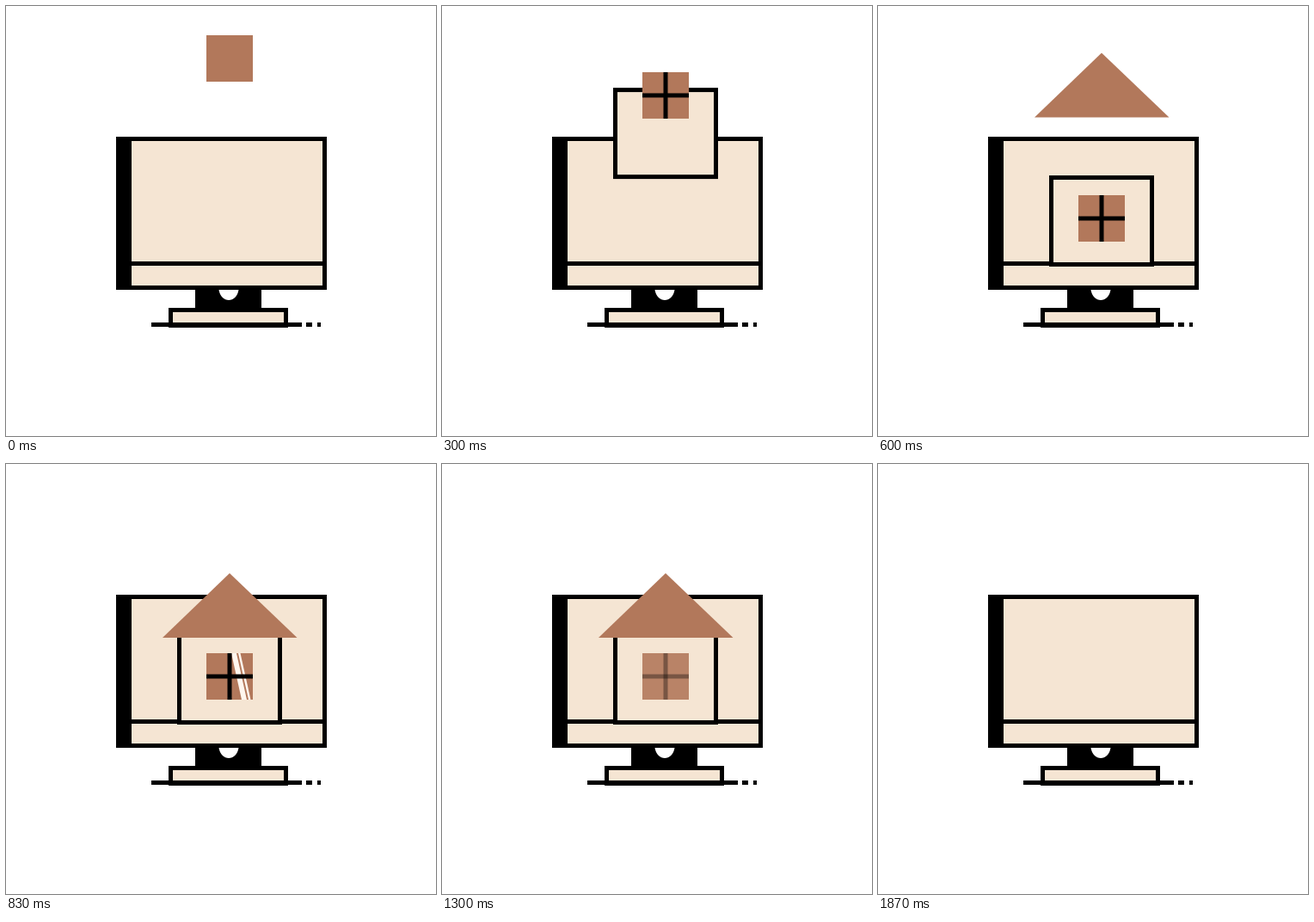
Animation of 500x500 px, one loop 2000 ms. Source, as an HTML page with a canvas:

```html
<!DOCTYPE html>
<html lang="en">
<head>
<meta charset="utf-8">
<title>House on a screen</title>
<style>
  html, body { margin: 0; width: 100%; height: 100%; overflow: hidden; background: #fff; }
  canvas { display: block; }
</style>
</head>
<body>
<canvas id="stage" width="500" height="500"></canvas>
<script>
const ctx = document.getElementById('stage').getContext('2d');
const BLACK = '#000', CREAM = '#f5e5d3', BROWN = '#b2785b', WHITE = '#fff';
const LOOP = 2000;

const ease = (f, from, to) => {
  const p = Math.min(1, Math.max(0, (f - from) / (to - from)));
  return p * p * (3 - 2 * p);
};

function rect(color, x, y, w, h) {
  ctx.fillStyle = color;
  ctx.fillRect(x, y, w, h);
}

function framed(x, y, w, h) {
  rect(BLACK, x, y, w, h);
  rect(CREAM, x + 5, y + 5, w - 10, h - 10);
}

function polygon(color, ...points) {
  ctx.fillStyle = color;
  ctx.beginPath();
  for (const [x, y] of points) ctx.lineTo(x, y);
  ctx.fill();
}

// Draws a part in its own layer state, shifted and faded.
function layer(alpha, dy, draw) {
  if (alpha <= 0) return;
  ctx.save();
  ctx.globalAlpha = alpha;
  ctx.translate(0, dy);
  draw();
  ctx.restore();
}

function monitor() {
  framed(128, 152, 245, 178);
  rect(BLACK, 128, 152, 18, 178);
  rect(BLACK, 146, 297, 225, 5);
  rect(BLACK, 220, 329, 77, 23);
  ctx.fillStyle = WHITE;
  ctx.beginPath();
  ctx.moveTo(247.5, 330);
  ctx.bezierCurveTo(250, 346, 268, 346, 270.5, 330);
  ctx.fill();
  framed(189, 351, 139, 23);
  rect(BLACK, 169, 368, 175, 5);
  rect(BLACK, 349, 368, 7, 5);
  rect(BLACK, 362, 368, 4, 5);
}

function wall() {
  const [x, y, w, h] = [199, 197, 122, 106];
  rect(CREAM, x + 5, y + 5, w - 10, h - 10);
  ctx.lineWidth = 5;
  ctx.strokeStyle = BLACK;
  ctx.strokeRect(x + 2.5, y + 2.5, w - 5, h - 5);
}

function shine(x) {
  ctx.beginPath();
  ctx.rect(233, 220, 54, 54);
  ctx.clip();
  const stripe = (left, width) => polygon('#fff6ee',
    [x + left, 220], [x + left + width, 220],
    [x + left + width + 12, 274], [x + left + 12, 274]);
  stripe(-10, 6);
  stripe(-2, 2.5);
}

function cross(f) {
  rect(BLACK, 257.5, 220, 5, 54 * ease(f, 0, 4));
  rect(BLACK, 233, 244.5, 54 * ease(f, 2, 6), 5);
}

const roof = () => polygon(BROWN, [260, 127], [338.5, 202], [182, 202]);

function draw(f) {
  rect(WHITE, 0, 0, 500, 500);
  monitor();

  const houseAlpha = 1 - ease(f, 51, 56);
  if (f >= 4) layer(houseAlpha, -187 * (1 - ease(f, 4.3, 14.3)), wall);

  const drop = -186 * (1 - ease(f, 5.83, 16));
  layer(1 - ease(f, 38, 43), drop, () => rect(BROWN, 233, 220, 54, 54));
  if (f > 18 && f < 32) layer(1, 0, () => shine(218 + 108 * ease(f, 18, 32)));
  layer(1 - ease(f, 33, 43), drop, () => cross(f));

  if (f >= 17) layer(houseAlpha, -98 * (1 - ease(f, 16, 22)), roof);
}

// Steps at 30 pictures a second; the small offset absorbs timer rounding.
const start = performance.now();
function tick() {
  const time = (performance.now() - start) % LOOP;
  draw(Math.floor((time + 4) * 0.03) % 60);
  requestAnimationFrame(tick);
}
tick();
</script>
</body>
</html>
```
